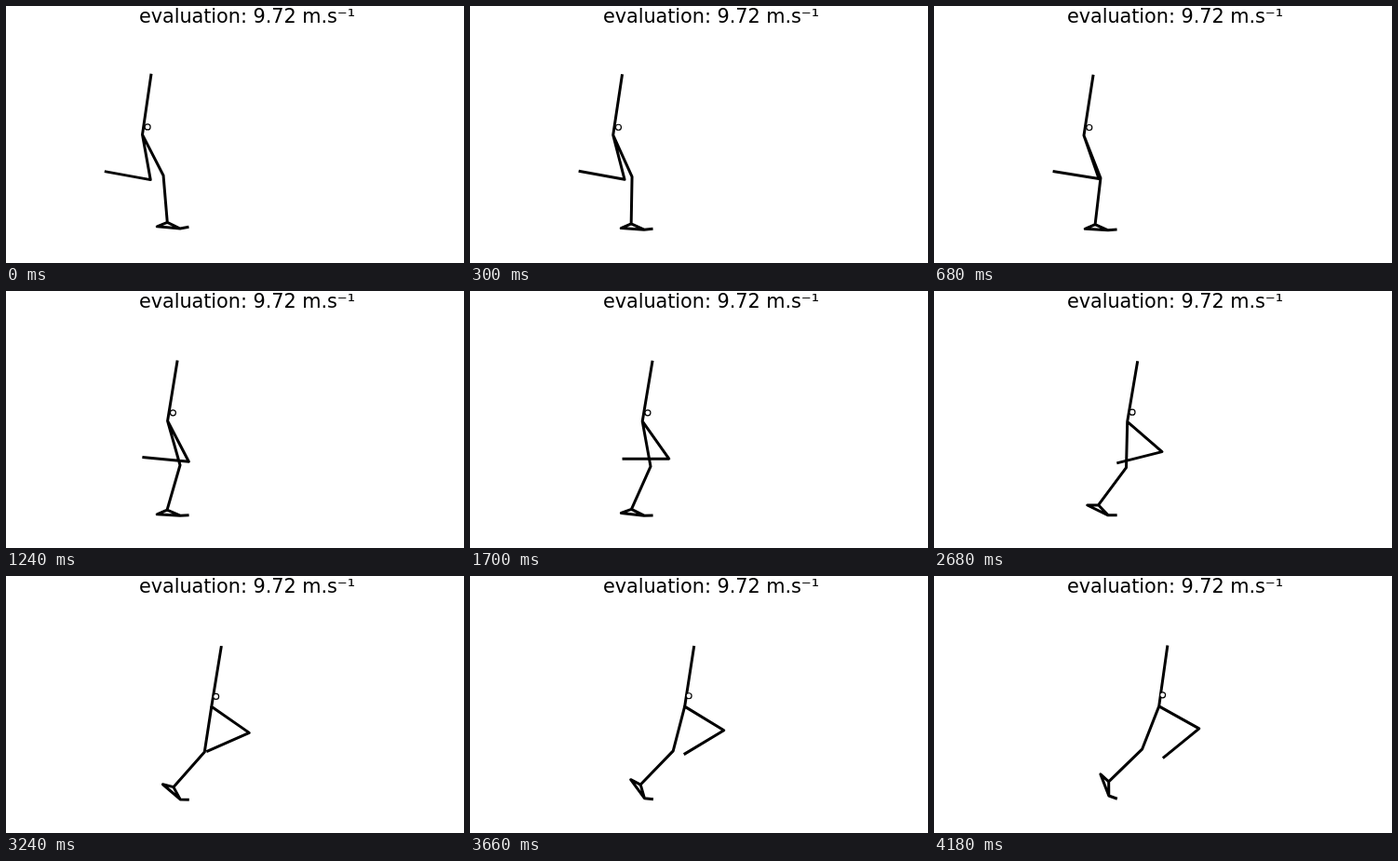
An HTML page that plays this animation: 492 by 276 pixels, repeating every 4.28 s.

```html
<!DOCTYPE html>
<html lang="en">
<head>
<meta charset="utf-8">
<title>Running stick figure</title>
<style>
  html, body { margin: 0; width: 100%; height: 100%; overflow: hidden; background: #fff; }
  svg { display: block; width: 492px; height: 276px; }
  text { font: 20.83px "DejaVu Sans", sans-serif; letter-spacing: -0.05px; text-anchor: middle; }
  path { fill: none; stroke: #000; stroke-width: 3; stroke-linejoin: round; }
  circle { fill: #fff; stroke: #000; stroke-width: 1.2; }
</style>
</head>
<body>
<svg viewBox="0 0 492 276">
  <text x="259" y="18">evaluation: 9.72 m.s⁻¹</text>
  <path id="body"/>
  <circle id="mass" r="3"/>
</svg>
<script>
const LOOP = 4280;
const LAST_STEP = 89;
const bodyPath = document.getElementById("body");
const mass = document.getElementById("mass");

// c0 + c1 u + c2 u² + ...
const poly = (u, ...c) => c.reduceRight((sum, k) => sum * u + k, 0);

// Angles are degrees from straight down, positive to the right
function reach([x, y], length, degrees) {
  const a = degrees * Math.PI / 180;
  return [x + length * Math.sin(a), y + length * Math.cos(a)];
}

const line = (...points) =>
  "M" + points.map(p => p.map(n => n.toFixed(2)).join(" ")).join("L");

// Pose of the stride, u from 0 (landing) to 1 (push-off)
function draw(u) {
  const landing = (1 - u) ** 10;
  const heelOff = Math.max(0, (u - 0.33) / 0.67) ** 1.45;

  const hip = [poly(u, 146.5, 91.6, 3.6), poly(u, 138.1, 6.3, -4.5)];
  const head = reach(hip, 66, 180 - poly(u, 8.3, 3.2, 1.1, -4.6));

  const swingKnee = reach(hip, 49.3, poly(u, 10.2, 51.9, 36.5, -37.7));
  const swingAnkle = reach(swingKnee, 50.2, poly(u, -100.3, -7.2, 91.5, -34.9));

  const knee = reach(hip, 49.3, poly(u, 27.2, -35, -13.6));
  const ball = [187 + 0.8 * u ** 6, 241.2 - 2.2 * landing - 5.2 * u ** 6];
  const foot = -93 - 2 * landing - 66 * heelOff;
  const heel = reach(ball, 24.8, foot);
  const ankle = reach(ball, 15.2, foot - 20.5);
  const toe = reach(ball, 9.6, 94 - 6 * u + 6 * landing - 18 * u ** 10);

  bodyPath.setAttribute("d",
    line(head, hip, swingKnee, swingAnkle) +
    line(hip, knee, ankle, heel, ball, ankle) +
    line(ankle, ball, toe));
  mass.setAttribute("cx", hip[0] + poly(u, 5.6, 1.8, -3.5));
  mass.setAttribute("cy", hip[1] + poly(u, -8.2, -1.2, -2.7));
}

// Steps come in threes, held 20, 100 and 20 ms
function stepAt(ms) {
  const rest = ms % 140;
  const step = 3 * Math.floor(ms / 140) + (rest < 20 ? 0 : rest < 120 ? 1 : 2);
  return Math.min(step, LAST_STEP);
}

const start = performance.now();
function tick() {
  draw(stepAt((performance.now() - start) % LOOP) / LAST_STEP);
  requestAnimationFrame(tick);
}
tick();
</script>
</body>
</html>
```
